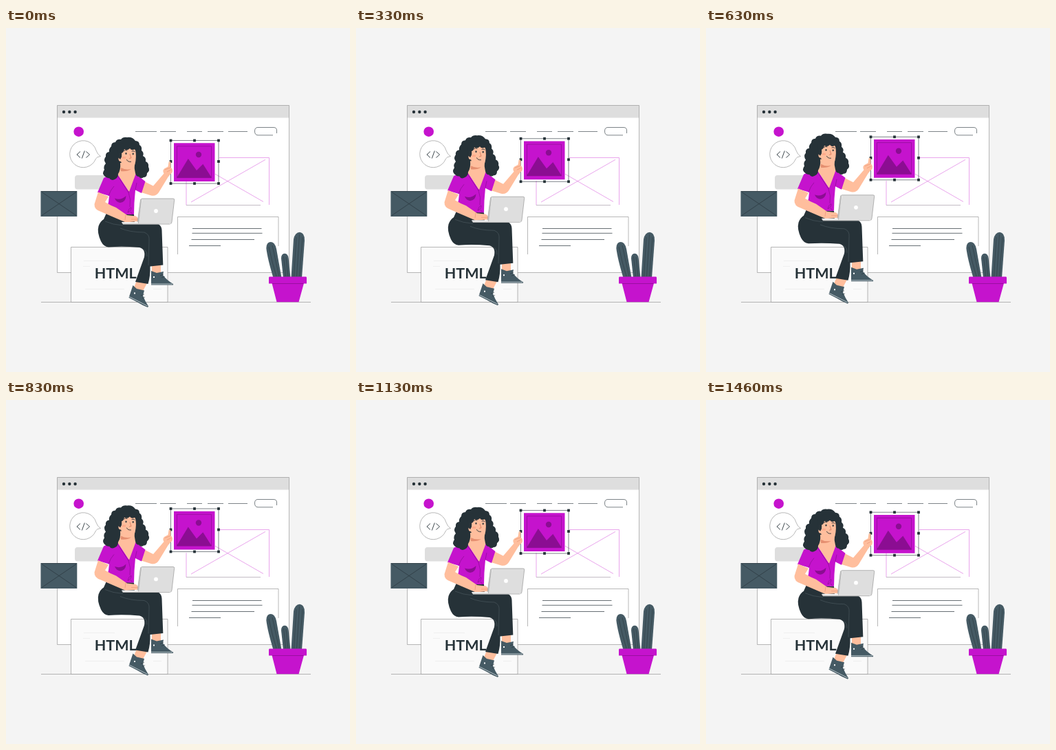
Write an HTML page that moves like this. It is 500 by 500 pixels and loops after 1.5 s.

```html
<!DOCTYPE html>
<html lang="en">
<head>
<meta charset="utf-8">
<title>Floating designer</title>
<style>
html, body { margin: 0; width: 100%; height: 100%; overflow: hidden; background: #f4f4f4; }
svg { display: block; width: 100vw; height: 100vh; }
.line { fill: none; stroke: #263238; stroke-width: .6; }
.soft { stroke: #888; }
.ink { fill: #263238; }
.slate { fill: #455a64; }
.pink { fill: #c513cd; }
.plum { fill: #8b0d92; }
.skin { fill: #ffbe9d; }
.grey { fill: #dedede; }
.wire { fill: none; stroke: #e07fe4; stroke-width: .7; }
.seam { fill: none; stroke: #56646b; stroke-width: .5; }
.fold { fill: none; stroke: #8b0d92; stroke-width: .7; }
.crease { fill: none; stroke: #e58f70; stroke-width: .6; }
.feature { fill: none; stroke: #263238; stroke-width: .9; stroke-linecap: round; }
text { font: 700 21.5px Lato, "Open Sans", sans-serif; }
</style>
</head>
<body>
<svg viewBox="0 0 500 500">
  <!-- browser window -->
  <path fill="#fff" d="M74.500 112.500H411.500V355.500H74.500Z"/>
  <path class="grey" d="M74.500 112.500H411.500V130.500H74.500Z"/>
  <path class="line soft" d="M74.500 112.500H411.500V355.500H74.500Z"/>
  <g class="ink"><circle cx="84" cy="122" r="2.200"/><circle cx="92.300" cy="122" r="2.200"/><circle cx="100.600" cy="122" r="2.200"/></g>
  <circle class="pink" cx="105.700" cy="150.700" r="7.300"/>
  <path class="line" d="M188 150.500H219M224 150.500H247M263 150.500H285M293 150.500H316M323 150.500H351"/>
  <path class="line" d="M393.500 153V149Q393.500 144.500 389 144.500H366Q361.500 144.500 361.500 150T366 155.800H388"/>

  <!-- code bubble -->
  <path class="line soft" d="M131 178A19.500 19.500 0 1 0 130.500 190Q132 187 137.500 186.500Q133 184 131 178"/>
  <path class="line" style="stroke-width:.9" d="M108 179.500L103 184L108 188.500M114.300 178.500L110.300 189.500M116.500 179.500L121.500 184L116.500 188.500"/>
  <rect class="grey" x="100" y="214" width="56" height="20.500" rx="4"/>
  <path class="slate" d="M50.500 237H103.300V274H50.500Z"/>
  <path class="line" d="M52 238.500L102 272.500M102 238.500L52 272.500M51 237.500H103"/>

  <!-- wireframe picture and text card -->
  <path class="wire" d="M310 188.500H382.500V257M262 222V257.500M304 212.300L374 252.500M269 253L377 191.300"/>
  <path class="wire" style="stroke:#aaa0ac" d="M262 257.500H370"/>
  <path class="line soft" d="M249.500 329V274.500H396V317"/>
  <path class="line" style="stroke-width:.7" d="M271 291.500H371.500M270.500 298.300H372.500M269.500 307.500H361M266 316.500H312"/>

  <!-- floor and block -->
  <path class="line soft" d="M51 398.500H443"/>
  <path fill="#fafafa" d="M94.500 318.500H235V398.500H94.500Z"/>
  <path class="line soft" d="M94.500 318.500H235V398.500H94.500Z"/>
  <path stroke="#ececec" stroke-width=".8" d="M113 338.500H158M112 346.500H122M115 379.500H172M214 379.500H226M214 338.500H224"/>
  <text class="ink" x="128.700" y="364.300">HTML</text>

  <!-- cactus -->
  <g class="slate">
    <path d="M388.500 363Q380 335 378.300 320Q378.500 311 385 311Q391 311.500 393 321L400.500 363Z"/>
    <path d="M403 363L400 335Q400 328 405 327.800Q410 328 410.700 335L413.500 363Z"/>
    <path d="M414.500 363L418 307Q420 297 427 296.800Q434.500 298 434 309L430 363Z"/>
  </g>
  <path class="line" style="stroke-width:.5" d="M382 318Q387 342 393 361M387 316L397 361M403.500 332L406.500 361M407 333L410 361M422 304L418.500 361M426.500 300L422.500 361M431 304L426.500 361"/>
  <path class="pink" d="M386.500 371H433L425.500 398.300H393.500ZM383 361.500H436Q437 361.500 437 363V371.500H382V363Q382 361.500 383 361.500Z"/>
  <path class="plum" d="M387 371.300H432.500V372H387Z"/>

  <g id="floating">
    <!-- selected picture -->
    <path class="line" d="M239.500 163.500H309V226H239.500Z"/>
    <path class="pink" d="M244 167.300H303.500V223H244Z"/>
    <path class="fold" d="M248.500 171.800H298.500V217.500H248.500Z"/>
    <path class="plum" d="M248 217.700L264.800 190L277 207L286.300 197.800L299 217.700Z"/>
    <circle class="plum" cx="280" cy="184" r="4.200"/>
    <g id="handles" class="ink"></g>

    <!-- raised arm -->
    <path class="skin" d="M199 222L214 229.500L229.500 211.500Q227 207 230 204.500L235.500 201.500L236.500 195Q238.500 192.500 239.500 195.500V202.500Q243 205 241.500 210L236 216L222 239Q218 245 211 243.500L195 238.500Z"/>
    <path class="crease" d="M231 206L236 204L239 203M234 209L240 206"/>

    <!-- legs -->
    <path class="skin" d="M212 342H225V357H212ZM190 367L205 371L198 384L186 377Z"/>
    <path class="slate" d="M211 353L219 356L229 354L228 359Q234 367 243 372V373.500H211ZM184.500 374L190 379L201 381.500L199 389Q202 397 207 404.500L206 406Q198 403 190 398L178.500 392Z"/>
    <path fill="none" stroke="#c3ced3" stroke-width=".9" d="M211 372H242M179 390.500Q192 397 205.500 404"/>
    <path class="line" d="M224 360L229 358M226 363L231 361M196 389L201 387M198 393L202 391"/>
    <path fill="#fff" d="M214 361h2v2h-2ZM186 384.500h2v2h-2Z"/>
    <path class="ink" d="M146 269L186 271L187 283H214Q226 284 226.500 294L228.300 344.500L209.500 346.500Q210 360 206.500 372L188 369L201 333Q203 321 194 319Q170 317 149 318.500Q142 318 138 310Q132 297 134.500 288Q137 281 142 278Z"/>
    <path class="seam" d="M166 291Q180 297 201 297Q209 300 208 309L207 345M144 281Q155 286 170 287M201 322Q206 326 205 332"/>

    <!-- shirt and neck -->
    <path class="pink" d="M142 218Q151 213 162 212L178.500 237L187 211L202.500 223L197 240L188 235.500Q186 254 186 271L147 271Q146 263 149 253L150 244L133 239Z"/>
    <path class="plum" d="M158 247.500Q167 251 174.500 244Q174 253 166 254Q160 253 158 247.500Z"/>
    <path class="fold" d="M161 213L178 239L188 212M149 244Q152 235 157 230M188 235L190 225M178 239Q182 249 180 260M177 268Q179 261 182 261Q182 266 177 268M181 267L184 271"/>
    <path class="skin" d="M165 190L187 198L189 211L179 238L162 212Q166 206 165 190Z"/>
    <path fill="#e58f70" d="M167 203Q174 207 182 205Q176 209 167 208Z"/>

    <!-- typing arm -->
    <path class="skin" d="M134 238.500L149 245L144 253Q152 258 160 261L176 272L189 273.500Q193 276 192 281L174 282.500Q154 274 138 267Q128 264 128.500 256Z"/>
    <path class="crease" d="M174 271L173 279M182 278H191"/>

    <!-- hair -->
    <path class="ink" d="M176 159Q170 158 167 162Q161 161 159 166Q153 166 153 172Q149 176 150 180Q144 181 145 187Q141 191 145 197Q141 201 143 206Q139 211 143 215Q147 219 150 218Q153 223 158 220Q163 218 163 212Q167 206 166 196L187 196Q186 204 188 211Q189 216 193 216Q196 220 200 217Q205 217 205 211Q210 207 207 202Q208 196 203 194Q204 188 199 186Q201 181 197 178Q198 172 194 170Q194 164 188 164Q184 158 176 159Z"/>

    <!-- face -->
    <path class="skin" d="M167 176Q177 169 188 177Q190 187 187.500 198Q185 206 177 204Q169 201 167 194Q163 194 163.500 189Q165 186 168 188Z"/>
    <path class="ink" d="M163 188Q159 176 166 169Q178 163 191 171L192 182Q189 180 187 176Q183 179 180 175Q176 179 172 176Q171 181 168 182Q169 187 166 191Z"/>
    <path class="feature" d="M171.500 178.500Q173.500 176.500 176 178M183 179Q185 178 187 179.500"/>
    <g class="ink"><ellipse cx="174.500" cy="182.500" rx="1" ry="1.400"/><ellipse cx="184.700" cy="183" rx="1" ry="1.400"/></g>
    <path fill="none" stroke="#d67859" stroke-width=".8" d="M180 183L182 189L179 189.500"/>
    <path class="feature" d="M175.500 191.500Q177 195 181.500 194.500"/>
    <path fill="#ff9b7d" opacity=".55" d="M169 187h5v3h-5Z"/>

    <!-- laptop -->
    <path class="grey" d="M198 248H243Q245 248 244.700 250L241 282Q240.500 285 238 285H192Z"/>
    <path class="line soft" d="M191 283L195.500 250Q196 248 198 248H243Q245 248 244.700 250L241 282Q240.500 285 238 285"/>
    <path fill="#bcbcbc" d="M195.500 249L197.500 248L193 283.500H191Z"/>
    <path fill="#eee" d="M168 282H192V284H240L238 285.500H170Z"/>
    <path class="line soft" d="M168 283L170 285H238"/>
    <circle fill="#fff" cx="218" cy="266" r="2.900"/>
  </g>
</svg>
<script>
const floating = document.getElementById("floating");
const handles = document.getElementById("handles");
const LOOP = 1500, LIFT = 6.2;

for (const x of [239.5, 274, 309])
  for (const y of [163.5, 194, 226])
    if (x !== 274 || y !== 194)
      handles.insertAdjacentHTML("beforeend",
        `<rect x="${x - 1.9}" y="${y - 1.9}" width="3.8" height="3.8"/>`);

// Rises and sinks at constant speed.
function draw() {
  const phase = performance.now() % LOOP / LOOP;
  const lift = LIFT * (1 - Math.abs(2 * phase - 1));
  floating.setAttribute("transform", `translate(0 ${-lift})`);
  requestAnimationFrame(draw);
}
draw();
</script>
</body>
</html>
```
